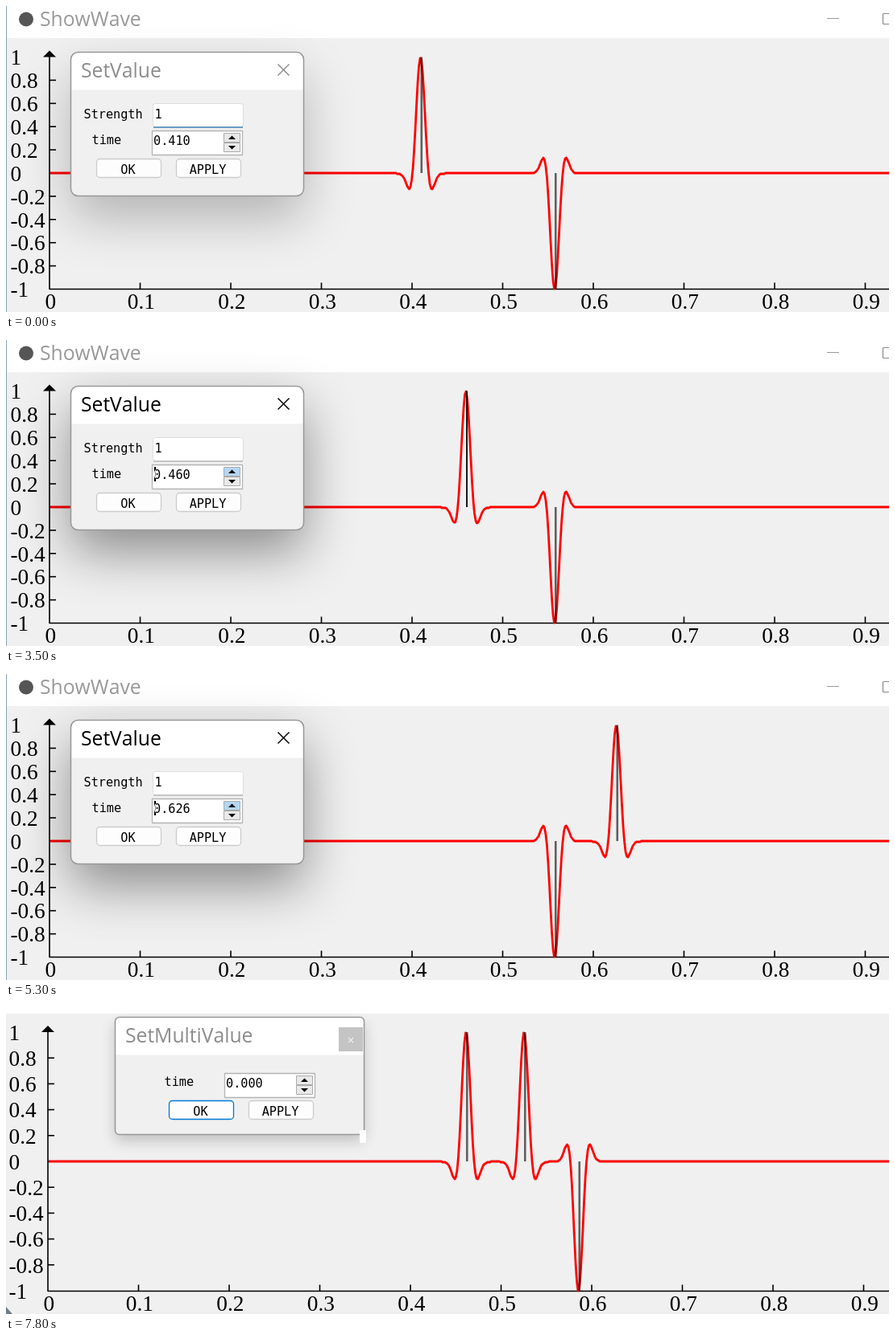
An HTML page with a canvas for the animation above (8 s loop, 1096x381 px).

```html
<!DOCTYPE html>
<html lang="en">
<head>
<meta charset="utf-8">
<title>ShowWave</title>
<style>
  html, body { margin: 0; width: 100%; height: 100%; overflow: hidden; }
  canvas { display: block; }
</style>
</head>
<body>
<canvas id="stage" width="1096" height="381"></canvas>
<script>
const ctx = document.getElementById('stage').getContext('2d');
const W = 1096, H = 381, LOOP = 8000, UNIT = 1125;
const UI = '24.7px "Open Sans", "Noto Sans", sans-serif';
const MONO = '15.2px "DejaVu Sans Mono", "Liberation Mono", monospace';
const SERIF = '27.3px "Liberation Serif", serif';

// Spin box value in thousandths over time; it moves in steps of two.
const KEYS = [
  [0, 410], [600, 410], [700, 412], [800, 412], [1400, 420], [1500, 422], [1600, 422],
  [1900, 428], [2300, 428], [2400, 430], [2600, 430], [2700, 432], [2800, 432],
  [2900, 434], [3000, 434], [3100, 436], [3500, 460], [3900, 510], [4400, 586],
  [4700, 624], [5200, 624], [5300, 626], [6100, 638], [6200, 638], [6600, 642],
  [6800, 646], [LOOP, 646]
];

function valueAt(time) {
  const i = KEYS.findIndex(key => key[0] > time);
  const [t0, v0] = KEYS[i - 1], [t1, v1] = KEYS[i];
  return 2 * Math.round((v0 + (v1 - v0) * (time - t0) / (t1 - t0)) / 2) / 1000;
}

function text(string, x, y, font, color = '#000', align = 'left') {
  ctx.font = font;
  ctx.fillStyle = color;
  ctx.textAlign = align;
  ctx.fontKerning = 'none';
  ctx.fillText(string, x, y);
}

function rect(x, y, w, h, fill) {
  ctx.fillStyle = fill;
  ctx.fillRect(x, y, w, h);
}

function line(points, color = '#000', width = 1.6) {
  ctx.beginPath();
  points.forEach(([x, y]) => ctx.lineTo(x, y));
  ctx.strokeStyle = color;
  ctx.lineWidth = width;
  ctx.stroke();
}

function polygon(points, fill) {
  ctx.beginPath();
  points.forEach(([x, y]) => ctx.lineTo(x, y));
  ctx.fillStyle = fill;
  ctx.fill();
}

function box(x, y, w, h, radius, fill, stroke, width = 1) {
  ctx.beginPath();
  ctx.roundRect(x, y, w, h, radius);
  ctx.fillStyle = fill;
  ctx.fill();
  if (!stroke) return;
  ctx.strokeStyle = stroke;
  ctx.lineWidth = width;
  ctx.stroke();
}

function cross(x, y, r, color, width) {
  line([[x - r, y - r], [x + r, y + r]], color, width);
  line([[x - r, y + r], [x + r, y - r]], color, width);
}

const wavelet = d => Math.abs(d) < 30 ? Math.exp(-d * d / 132) * Math.cos(0.157 * d) : 0;

// pulses: list of [time, strength]
function drawChart(x0, top, zero, pulses) {
  const bottom = 352.5, amplitude = zero - top;
  line([[x0, top - 3], [x0, bottom], [W, bottom]]);
  polygon([[x0, top - 8], [x0 + 8, top], [x0 - 8, top]], '#000');
  for (let i = -5; i <= 5; i++) {
    const y = zero - amplitude * i / 5;
    if (i < 5 && i > -5) line([[x0, y], [x0 + 8, y]]);
    text(String(i / 5), x0 - 48.5, y + 9.7, SERIF);
  }
  for (let i = 0; i < 10; i++) {
    const x = x0 + UNIT * i / 10;
    if (i) line([[x, bottom], [x, bottom - 8]]);
    text(String(i / 10), x + 1.3, 377, SERIF, '#000', 'center');
  }
  // Heights snap down to whole pixels, which leaves a soft foot below the zero line.
  const curve = [];
  for (let x = x0 + 1; x <= W + 2; x += 1.5) {
    const sum = pulses.reduce((s, [time, strength]) =>
      s + strength * wavelet(x + 0.75 - x0 - UNIT * time), 0);
    curve.push([x, zero + Math.ceil(-amplitude * sum)]);
  }
  ctx.lineJoin = 'round';
  line(curve, '#f00', 2.8);
  for (const [time, strength] of pulses) {
    const x = x0 + 0.5 + UNIT * time;
    const sharp = Math.abs(x - Math.round(x)) < 0.01;
    line([[x, zero], [x, zero - amplitude * strength]],
      sharp ? '#000' : 'rgba(0,0,0,.6)', sharp ? 1.8 : 2.6);
  }
}

function drawDialog(x, y, w, h, radius, title, titleColor, shadow) {
  ctx.save();
  ctx.shadowColor = `rgba(0,0,0,${shadow.alpha})`;
  ctx.shadowBlur = shadow.blur;
  ctx.shadowOffsetY = shadow.drop;
  box(x, y, w, h, radius, '#f0f0f0');
  ctx.restore();
  box(x, y, w, 47, [radius, radius, 0, 0], '#fff');
  ctx.beginPath();
  ctx.roundRect(x, y, w, h, radius);
  ctx.strokeStyle = '#999';
  ctx.lineWidth = 1.5;
  ctx.stroke();
  text(title, x + 12.5, y + 31.5, UI, titleColor);
}

function drawButton(x, y, label, stroke = '#ccc') {
  box(x + 0.5, y + 0.5, 80, 23, 4, '#fdfdfd', stroke, 1.3);
  text(label, x + 39.5, y + 19, MONO, '#000', 'center');
}

function drawSpinBox(x, y, value, upFill = '#e9e9e9', caret = false) {
  box(x + 0.5, y + 0.5, 112, 30, 0, '#fff', '#b4b4b4', 1.3);
  for (const [top, fill, dir] of [[y + 3, upFill, -1], [y + 15, '#e9e9e9', 1]]) {
    box(x + 89.5, top + 0.5, 20, 11, 0, fill, '#aaa');
    const ax = x + 99.5, ay = top + 6;
    polygon([[ax - 4.5, ay - 2 * dir], [ax + 4.5, ay - 2 * dir], [ax, ay + 2.5 * dir]], '#000');
  }
  text(value.toFixed(3), x + 2, y + 17.5, MONO);
  if (caret) {
    // The caret inverts what lies under it.
    ctx.globalCompositeOperation = 'difference';
    rect(x + 3, y + 3, 2, 18, '#fff');
    ctx.globalCompositeOperation = 'source-over';
  }
}

function drawSingle(time) {
  const active = time >= 700;
  const value = valueAt(time);
  rect(0, 0, W, 40, '#fff');
  ctx.beginPath();
  ctx.arc(25, 16.5, 9, 0, 2 * Math.PI);
  ctx.fillStyle = '#555';
  ctx.fill();
  text('ShowWave', 42, 25, UI, '#999');
  line([[1019, 15.5], [1034, 15.5]], '#999', 1);
  box(1088.5, 9.5, 13, 13, 1, '#fff', '#888', 1.2);
  drawChart(54, 63.5, 208, [[value, 1], [0.558, -1]]);
  rect(0, 0, 1, H, '#8ba5b5');

  const ink = active ? '#000' : '#8c8c8c';
  drawDialog(80.5, 57.5, 289, 179, 9, 'SetValue', ink, active
    ? { alpha: 0.42, blur: 64, drop: 27 }
    : { alpha: 0.25, blur: 62, drop: 28 });
  cross(344.5, 79.5, 7, ink, 1.5);
  text('Strength', 96.5, 140, MONO);
  text('time', 106.5, 172, MONO);
  box(182.5, 121.5, 112, 29, 3, '#fff', '#ddd');
  rect(183, 150, 111, 2, time < 100 ? '#6a9cc4' : '#c4c4c4');
  text('1', 184.5, 140, MONO);
  const hover = time >= 300 && time < 7100;
  const pressed = hover && time >= 700 && value !== valueAt(time - 100);
  drawSpinBox(181, 155, value, pressed ? '#b4d6f4' : hover ? '#d3e6f6' : '#e9e9e9',
    active && time < 7100);
  drawButton(112, 190, 'OK');
  drawButton(211, 190, 'APPLY');
}

function drawMulti() {
  rect(0, 0, W, 7, '#fff');
  drawChart(52, 30, 191, [[0.462, 1], [0.526, 1], [0.586, -1]]);
  polygon([[0, 372], [8, H], [0, H]], '#6c7f88');
  drawDialog(135.5, 11.5, 309, 146, 5, 'SetMultiValue', '#8c8c8c',
    { alpha: 0.2, blur: 18, drop: 8 });
  rect(413, 24, 30, 30, '#c4c4c4');
  cross(428, 40, 3, '#eee', 1.2);
  rect(439, 152, 8, 16, '#fff');
  text('time', 196.5, 97, MONO);
  drawSpinBox(271, 81, 0);
  drawButton(202, 115, 'OK', '#0078d4');
  drawButton(301, 115, 'APPLY');
}

function frame() {
  const time = Math.floor(performance.now() % LOOP / 100) * 100;
  rect(0, 0, W, H, '#f0f0f0');
  if (time < 7600) drawSingle(time);
  else drawMulti();
  requestAnimationFrame(frame);
}
frame();
</script>
</body>
</html>
```
